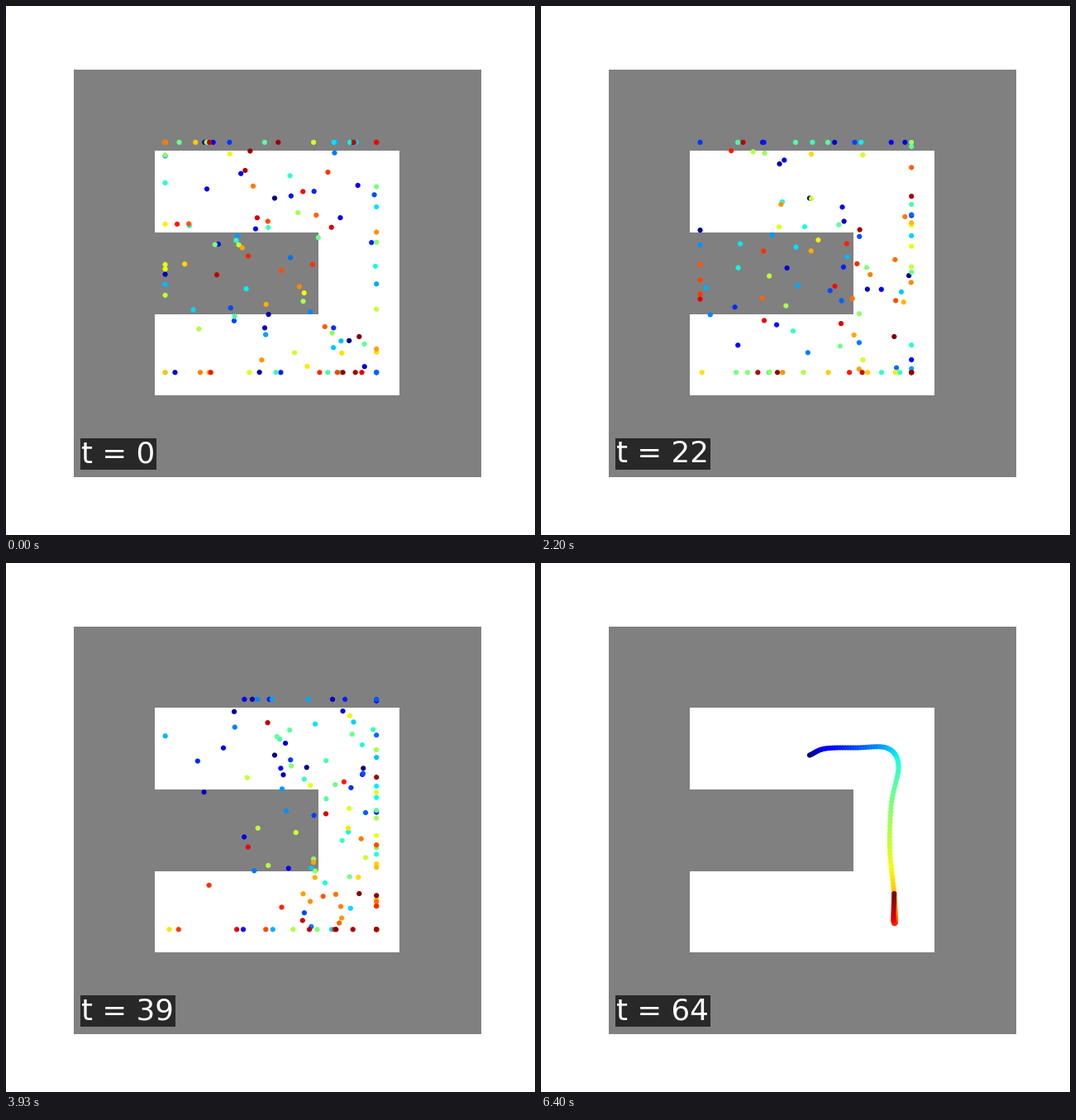
Write a matplotlib script that moves like this. It is 640 px wide and 640 px high and loops after 6.54 s.

```python
import numpy as np
import matplotlib.pyplot as plt
from matplotlib.animation import FuncAnimation
from matplotlib.colors import ListedColormap

SIZE, DPI = 640, 100
STEPS, POINTS = 64, 128
LOOP_MS, TICK_MS = 6540, 20
PAPER, WALL, LABEL = "#ffffff", "#808080", "#282828"

# pixel edges of the maze, and the range that positions are clipped to
LEFT, TOP, SIDE = 81.6, 76.8, 492.8
CENTER = np.array([320.4, 304.1])
HALF = np.array([127.8, 139.2])

# evenly timed key points of the finished path
KEYS = np.array([(325, 232.5), (344, 224.5), (382, 223.5), (419, 224),
                 (432.5, 245), (424, 291), (422, 345), (427, 398),
                 (429, 432), (426.5, 432), (427.3, 400)])


def smooth_path(n):
    """Cubic Hermite curve through the key points, sampled n times."""
    slope = np.gradient(KEYS, axis=0)
    s = np.linspace(0, len(KEYS) - 1, n)
    i = np.minimum(s.astype(int), len(KEYS) - 2)
    t = (s - i)[:, None]
    ease = t * t * (3 - 2 * t)
    return (KEYS[i] * (1 - ease) + KEYS[i + 1] * ease
            + t * (1 - t) ** 2 * slope[i] - t * t * (1 - t) * slope[i + 1])


def cosine_schedule():
    """Betas and cumulative alphas of the cosine noise schedule."""
    x = np.arange(STEPS + 1) / STEPS
    f = np.cos((x + 0.008) / 1.008 * np.pi / 2) ** 2
    beta = np.clip(1 - f[1:] / f[:-1], 0, 0.999)
    return beta, np.concatenate([[1], np.cumprod(1 - beta)])


def denoise():
    """Reverse diffusion from pure noise to the path, ends held fixed."""
    rng = np.random.default_rng(12)
    goal = (smooth_path(POINTS) - CENTER) / HALF
    beta, abar = cosine_schedule()

    def pin(x):
        x[[0, -1]] = goal[[0, -1]]
        return x

    x = pin(rng.normal(size=goal.shape))
    states = [x]
    for n in range(STEPS, 0, -1):
        b, now, nxt = beta[n - 1], abar[n], abar[n - 1]
        mean = (b * np.sqrt(nxt) * goal + (1 - nxt) * np.sqrt(1 - b) * x) / (1 - now)
        sigma = np.sqrt(b * (1 - nxt) / (1 - now))
        x = pin(mean + sigma * rng.normal(size=goal.shape))
        states.append(x)
    return [CENTER + HALF * np.clip(s, -1, 1) for s in states]


def step_at(ms):
    # steps alternate between a long and a short hold
    k = ms // 100
    if k % 2 and ms % 100 < 20:
        k -= 1
    return min(k, STEPS)


states = denoise()

fig = plt.figure(figsize=(SIZE / DPI, SIZE / DPI), dpi=DPI, facecolor=PAPER)
ax = fig.add_axes([LEFT / SIZE, 1 - (TOP + SIDE) / SIZE, SIDE / SIZE, SIDE / SIZE])
ax.axis("off")

maze = np.ones((5, 5))
maze[1:4, 1:4] = 0
maze[2, 1:3] = 1
ax.imshow(maze, cmap=ListedColormap([PAPER, WALL]), interpolation="nearest",
          extent=(LEFT, LEFT + SIDE, TOP + SIDE, TOP), aspect="auto")

dots = ax.scatter(*states[0].T, c=np.linspace(0, 1, POINTS), cmap="jet",
                  s=20, linewidths=0, zorder=2)
ax.set_xlim(LEFT, LEFT + SIDE)
ax.set_ylim(TOP + SIDE, TOP)

label = ax.text(0.02, 0.021, "t = 0", transform=ax.transAxes, color="white",
                family="DejaVu Sans", size=25.7, va="bottom", zorder=3,
                bbox=dict(boxstyle="square,pad=0.05", fc=LABEL, lw=0))


def draw(i):
    k = step_at(i * TICK_MS)
    dots.set_offsets(states[k])
    label.set_text(f"t = {k}")
    return dots, label


anim = FuncAnimation(fig, draw, frames=LOOP_MS // TICK_MS, interval=TICK_MS,
                     repeat=True, repeat_delay=0)
plt.show()
```
